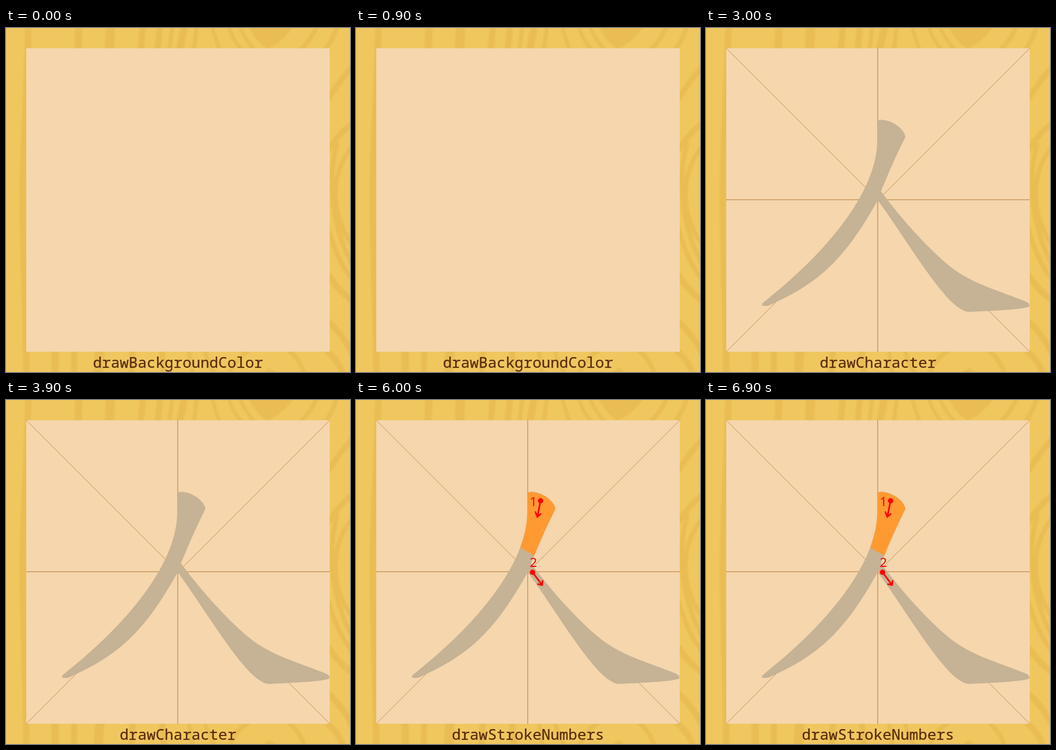
Recreate the animation shown at these times as an HTML page. Size 645 by 645 pixels, loop 7500 ms.

```html
<!DOCTYPE html>
<html lang="en">
<head>
<meta charset="utf-8">
<title>Drawing steps</title>
<style>
  html, body { margin: 0; width: 100%; height: 100%; overflow: hidden; background: #f0c75f; }
  svg { display: block; width: 100vw; height: 100vh; }

  .grain { fill: none; stroke: #e9bd53; filter: url(#soft); }
  .guides { fill: none; stroke: #c58a42; stroke-width: 1; }
  .guides .axis { stroke: #d2a46b; stroke-width: 2; }
  .glyph { fill: #c6b294; }
  .progress { fill: #ff9a33; }
  .order { fill: none; stroke: #f00; stroke-width: 3; }
  .order circle, .order text { fill: #f00; stroke: none; }
  .order text { font: 24px "Noto Sans", "Open Sans", sans-serif; text-anchor: middle; }
  .caption {
    font: 500 28px "Noto Sans Mono", "DejaVu Sans Mono", monospace;
    fill: #572a0b; stroke: #572a0b; stroke-width: .25; text-anchor: middle;
  }

  /* Layers stay once added; each caption lasts one step. */
  .layer { animation: 7.5s step-end infinite; }
  .guides { animation-name: from1; }
  .glyph { animation-name: from2; }
  .progress { animation-name: from3; }
  .order { animation-name: from4; }
  .caption { animation: once 7.5s step-end infinite; animation-delay: calc(var(--step) * 1.5s - 7.5s); }
  @keyframes from1 { 0% { opacity: 0 } 20%, 100% { opacity: 1 } }
  @keyframes from2 { 0% { opacity: 0 } 40%, 100% { opacity: 1 } }
  @keyframes from3 { 0% { opacity: 0 } 60%, 100% { opacity: 1 } }
  @keyframes from4 { 0% { opacity: 0 } 80%, 100% { opacity: 1 } }
  @keyframes once { 0% { opacity: 1 } 20%, 100% { opacity: 0 } }
</style>
</head>
<body>
<svg viewBox="0 0 645 645">
  <defs>
    <filter id="soft" filterUnits="userSpaceOnUse" x="-20" y="-20" width="685" height="685">
      <feGaussianBlur stdDeviation="1.4"/>
    </filter>
    <clipPath id="drawn"><path d="M279 259L394 328L400 100H280Z"/></clipPath>
    <path id="person" d="M322 174C335 167 370 183 374 204Q352 248 334 292L328 306
      C375 370 440 438 476 460C510 482 550 493 600 513C604 515 608 518 606 522
      C600 527 545 530 500 532C490 533 485 532 475 525C435 500 365 380 322 323
      C262 430 215 478 116 521H106L105 518L106 516C265 390 319 285 321 215Z"/>
  </defs>

  <rect width="645" height="645" fill="#f0c75f"/>
  <g class="grain">
    <path stroke-width="13" d="M42 -5C38 160 30 240 32 360S38 560 38 650"/>
    <path stroke-width="14" d="M137 -5L135 45M92 600V650M335 -5L325 45"/>
    <path stroke-width="18" d="M196 -5L194 45M176 600L173 650"/>
    <path stroke-width="12" d="M257 -5L252 45M289 -5L284 45M128 600L127 650M238 600L235 650M292 600L296 650"/>
    <path stroke-width="8" d="M312 -5L306 45M358 -5L352 45M342 600L350 650M372 600Q378 628 392 650"/>
    <path stroke-width="7" d="M386 -5Q392 18 402 45M417 -5Q425 24 446 45M437 -5Q450 25 470 45"/>
    <path stroke-width="9" d="M583 -5Q573 22 548 45M621 -5Q612 24 596 45M420 645Q432 618 455 605M530 605Q552 622 560 650"/>
    <path stroke-width="11" d="M650 72Q626 98 604 134M650 178Q623 198 604 230"/>
    <path stroke-width="9" d="M650 222C607 270 607 350 650 408M622 215C604 270 604 360 650 445M604 375Q622 440 650 472"/>
    <path stroke-width="12" d="M604 462Q620 490 650 512M604 550Q632 575 650 612M600 605Q622 620 632 650"/>
    <path fill="#e9bd53" stroke="none" d="M454 -5Q466 24 490 39Q521 26 541 -5ZM480 646L493 637L507 646Z"/>
  </g>
  <rect x="38" y="38" width="569" height="569" fill="#f5d6ad"/>

  <g class="layer guides">
    <path d="M38 38L607 607M607 38L38 607"/>
    <path class="axis" d="M38 322H607M322 38V607"/>
  </g>
  <use class="layer glyph" href="#person"/>
  <g class="layer progress"><use href="#person" clip-path="url(#drawn)"/></g>
  <g class="layer order">
    <path d="M346 189L340 219M336 209L340 219L347 213M331 323L349 347M340 345L349 347L350 338"/>
    <circle cx="346" cy="189" r="5"/>
    <circle cx="331" cy="323" r="5"/>
    <text x="332.5" y="199">1</text>
    <text x="332.5" y="313">2</text>
  </g>

  <text class="caption" style="--step:0" x="322.5" y="637">drawBackgroundColor</text>
  <text class="caption" style="--step:1" x="322.5" y="637">drawGuidelines</text>
  <text class="caption" style="--step:2" x="322.5" y="637">drawCharacter</text>
  <text class="caption" style="--step:3" x="322.5" y="637">drawAnimation</text>
  <text class="caption" style="--step:4" x="322.5" y="637">drawStrokeNumbers</text>
</svg>
</body>
</html>
```
